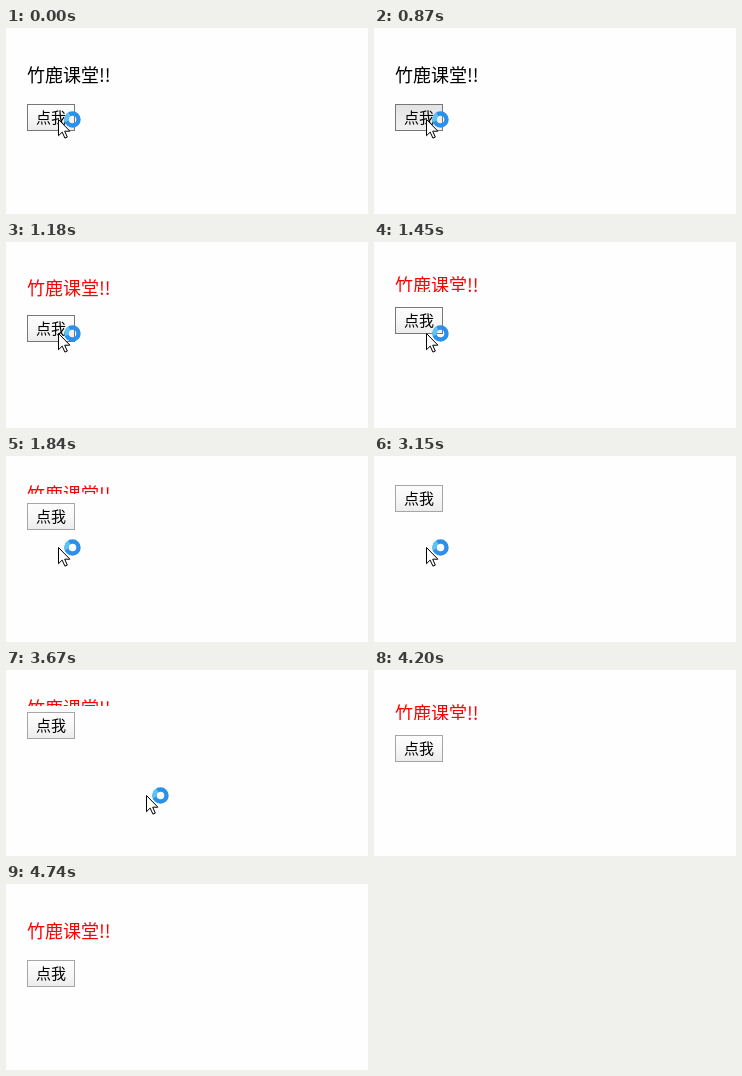
Recreate the animation shown at these times as an HTML page. Size 362 px wide and 186 px high, loop 5.61 s.

```html
<!DOCTYPE html>
<html lang="zh">
<head>
<meta charset="utf-8">
<title>slide</title>
<style>
  html, body { margin: 0; width: 100%; height: 100%; overflow: hidden; background: #fefefe; }
  body { position: relative; font-family: "Noto Sans CJK SC", "Noto Sans CJK", "Noto Sans", sans-serif; }
  #text {
    position: absolute; left: 21px; top: 38px; width: 300px; height: 20px;
    margin: 0; overflow: hidden; font-size: 18px; line-height: 16px; white-space: nowrap;
  }
  #btn {
    position: absolute; left: 21px; top: 76px; width: 48px; height: 27px;
    box-sizing: border-box; border: 1px solid #a6a6a6;
    background: linear-gradient(#fdfdfd, #f7f7f7 50%, #ececec);
    font-size: 15px; line-height: 24px; text-align: center; color: #000;
  }
  #btn.hover { border-color: #777; }
  #btn.down { background: linear-gradient(#e2e2e2, #ececec 50%, #f0f0f0); }
  #cursor { position: absolute; left: 0; top: 0; width: 26px; height: 30px; overflow: visible; }
</style>
</head>
<body>
<p id="text">竹鹿课堂!!</p>
<div id="btn">点我</div>
<svg id="cursor" viewBox="0 0 26 30">
  <path d="M.5 8.5v16.2l3.7-3.6 2.7 6 2.4-1-2.6-5.9h5.2z" fill="#fff" stroke="#000"/>
  <g fill="none" stroke-width="4.4">
    <circle cx="14.5" cy="8.5" r="6" stroke="#2b90ea"/>
    <path d="M8.8 10.4A6 6 0 0 1 11.5 3.3" stroke="#5cc3f2"/>
  </g>
</svg>
<script>
const LOOP = 5610, CLICK = 870, STEP = 133;
const SLIDE = 1740, UP = 906, DOWN = 2956;
const LEAVE = CLICK + 19 * STEP;

const $ = id => document.getElementById(id);
const text = $('text'), btn = $('btn'), cursor = $('cursor');

// eased progress of a slide that begins at start
function swing(t, start) {
  const p = Math.min(1, Math.max(0, (t - start) / SLIDE));
  return .5 - Math.cos(p * Math.PI) / 2;
}

// the picture advances in even steps after the click
function stepped(time) {
  return time < CLICK ? 0 : CLICK + Math.floor((time - CLICK) / STEP) * STEP;
}

function draw(now) {
  const t = stepped(now % LOOP);
  const open = 1 - swing(t, UP) + swing(t, DOWN);

  // the paragraph's top margin collapses with the body's
  const y = 20 + Math.max(9, 18 * open);
  const top = Math.floor(y);
  const btnTop = Math.floor(y + 38 * open);
  text.style.top = top + 'px';
  text.style.height = Math.floor(y + 20 * open) - top + 'px';
  text.style.color = t <= CLICK ? '#000' : '#f00';

  btn.style.top = btnTop + 'px';
  btn.classList.toggle('hover', t < DOWN && btnTop + 27 > 91);
  btn.classList.toggle('down', t === CLICK);

  // the pointer speeds away, then is gone
  const k = Math.max(0, (t - LEAVE) / (2 * STEP));
  const x = 52 + Math.round(88 * k ** 3);
  const tip = 91 + Math.round(34 * k ** 3);
  cursor.style.display = k > 1 ? 'none' : 'block';
  cursor.style.transform = `translate(${x}px, ${tip - 8}px)`;
}

function frame() {
  draw(performance.now());
  requestAnimationFrame(frame);
}
frame();
</script>
</body>
</html>
```
